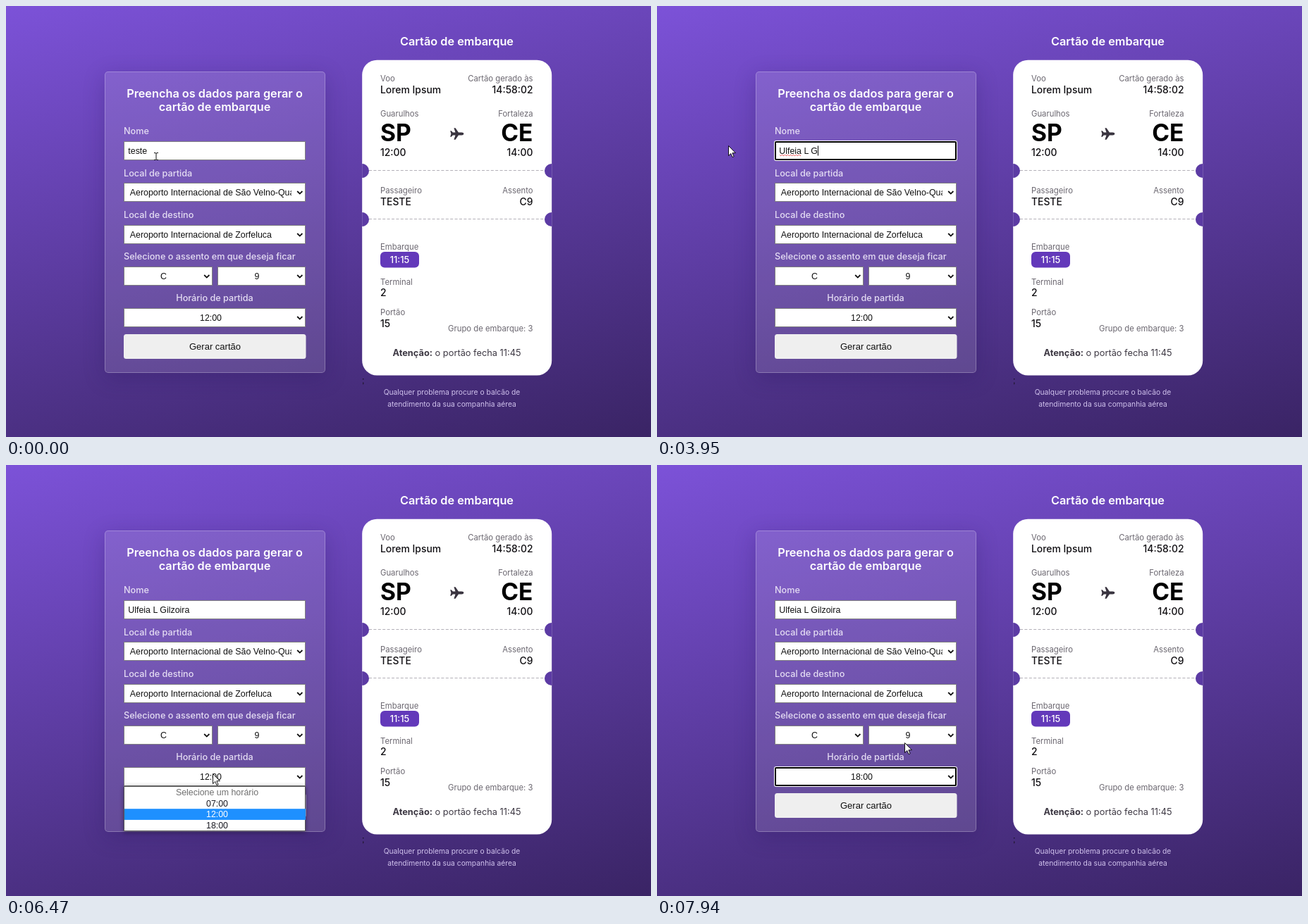
These frames come from a looping animation (915x612 px, 8 s). An HTML page:

```html
<!DOCTYPE html>
<html lang="pt-BR">
<head>
<meta charset="utf-8">
<title>Cartão de embarque</title>
<style>
  html, body { margin: 0; width: 100%; height: 100%; overflow: hidden; }
  body { position: relative; background: linear-gradient(167deg, #7c52d8, #3a2465); }
  #panel {
    position: absolute; left: 140px; top: 93px; width: 313px; height: 428px;
    box-sizing: border-box; border: 1px solid rgba(255,255,255,.24); border-radius: 5px;
    background: rgba(255,255,255,.12); box-shadow: 0 7px 30px rgba(35,20,90,.26);
  }
  svg { position: absolute; left: 0; top: 0; display: block; }
  text { white-space: pre; font-family: Inter, "Open Sans", sans-serif; }
  .ui { font: 12.4px "Liberation Sans", Arial, sans-serif; fill: #111; }
  .button { font-size: 13px; }
  .title { font-size: 16.3px; font-weight: 600; fill: #fff; }
  .field { font-size: 12.65px; font-weight: 500; fill: #e4dcf3; }
  .label { font-size: 11.3px; fill: #6b6770; }
  .value { font-size: 13.9px; font-weight: 550; fill: #121014; }
  .code { font-size: 33.6px; font-weight: 700; fill: #000; }
  .pill { font-size: 12.8px; font-weight: 550; fill: #fff; }
  .notice { font-size: 12.8px; fill: #3d3843; }
  .notice tspan { font-weight: 700; }
  .foot { font-size: 10.3px; font-weight: 400; fill: #cfc1ec; }
  .box { fill: #fff; stroke: #808080; }
  .ring { fill: none; stroke: #000; stroke-width: 2; }
  .halo { fill: none; stroke: #fff; stroke-width: 2; }
</style>
</head>
<body>
<div id="panel"></div>
<svg id="stage" width="915" height="612" viewBox="0 0 915 612">
  <defs>
    <clipPath id="airportClip"><rect x="170" y="250" width="235" height="30"/></clipPath>
    <clipPath id="cardClip"><rect x="505.2" y="76.7" width="269" height="447.8" rx="21"/></clipPath>
    <clipPath id="selectionClip"><rect id="selectionArea" y="198" height="15"/></clipPath>
    <filter id="shadow" x="-10%" y="-30%" width="120%" height="160%">
      <feDropShadow dx="0" dy="1" stdDeviation="3" flood-opacity=".45"/>
    </filter>
  </defs>

  <g id="form"></g>

  <text id="typed" class="ui" x="173.3" y="210"></text>
  <g id="selection">
    <rect id="selectionFill" y="198" height="15" fill="#3390ff"/>
    <text class="ui" x="173.3" y="210" style="fill:#fff" clip-path="url(#selectionClip)">teste</text>
  </g>
  <path id="squiggle" fill="none" stroke="#e33" stroke-width=".9"/>
  <rect id="caret" y="198.5" width="1" height="14" fill="#000"/>
  <g id="nameFocus"></g>
  <g id="timeFocus"></g>

  <g id="card">
    <g clip-path="url(#cardClip)">
      <rect x="505" y="76" width="270" height="449" fill="#fff"/>
      <g fill="#5c3ba4">
        <circle cx="505" cy="234" r="10"/><circle cx="774" cy="234" r="10"/>
        <circle cx="505" cy="303" r="10"/><circle cx="774" cy="303" r="10"/>
      </g>
      <path d="M515 233.5H764M515 302.5H764" stroke="#b3b0b8" stroke-dasharray="4 2.4"/>
    </g>
    <path fill="#39343f" d="M649.3 181.5q0-1.9-2.8-1.9h-4.6l-4.3-6.4h-2.2l2.1 6.4h-3.6l-2.1-2.4h-1.6l1.2 4.3-1.2 4.3h1.6l2.1-2.4h3.6l-2.1 6.4h2.2l4.3-6.4h4.6q2.8 0 2.8-1.9z"/>
    <rect x="531" y="349" width="55" height="22.5" rx="6" fill="#6339ba"/>
  </g>

  <g id="menu">
    <rect x="167.5" y="456.5" width="257" height="63" fill="#fff" stroke="#555" filter="url(#shadow)"/>
    <rect id="highlight" x="168" width="257" height="15.7" fill="#1e90ff"/>
  </g>

  <circle id="press" r="10" fill="#c4b440" fill-opacity=".74"/>
  <path id="arrow" fill="#fff" stroke="#000" stroke-width=".9" stroke-linejoin="round"
        d="M.5.5V14.6L3.8 11.5 6 16.6 8.1 15.7 5.9 10.7H10.4Z"/>
  <path id="beam" fill="none" stroke="#111" d="M-3-4.5h2.2l.8 1 .8-1H3M0-4V4.5M-3 5.5h2.2l.8-1 .8 1H3"/>
</svg>
<script>
const LOOP = 8000;
const $ = id => document.getElementById(id);

function add(parent, tag, attrs, content) {
  const node = document.createElementNS("http://www.w3.org/2000/svg", tag);
  for (const key in attrs) node.setAttribute(key, attrs[key]);
  if (content) node.textContent = content;
  $(parent).append(node);
  return node;
}
const write = (parent, cls, x, y, content, anchor = "start") =>
  add(parent, "text", { class: cls, x, y, "text-anchor": anchor }, content);

const FIELD_HEIGHT = 27;
function field(x, y, width, isSelect) {
  add("form", "rect", {
    class: "box", x: x + .5, y: y + .5, width: width - 1, height: FIELD_HEIGHT - 1
  });
  if (isSelect) add("form", "path", {
    d: `M${x + width - 11.8} ${y + 12}l3.6 3.6 3.6-3.6`,
    fill: "none", stroke: "#111", "stroke-width": 1.8
  });
}
function focusRing(parent, x, y, width) {
  add(parent, "rect", { class: "halo", x, y, width, height: FIELD_HEIGHT, rx: 2 });
  add(parent, "rect", {
    class: "ring", x: x + 1, y: y + 1, width: width - 2, height: FIELD_HEIGHT - 2, rx: 1
  });
}

// Form
write("form", "title", 296, 130, "Preencha os dados para gerar o", "middle");
write("form", "title", 296, 149, "cartão de embarque", "middle");
write("form", "field", 167, 182, "Nome");
write("form", "field", 167, 241.5, "Local de partida");
write("form", "field", 167, 300.5, "Local de destino");
write("form", "field", 167, 360, "Selecione o assento em que deseja ficar");
write("form", "field", 296, 419, "Horário de partida", "middle");
field(167, 192, 258);
field(167, 251, 258, true);
field(167, 311, 258, true);
field(167, 370, 126, true);
field(300, 370, 125, true);
field(167, 429, 258, true);
focusRing("nameFocus", 167, 192, 258);
focusRing("timeFocus", 167, 429, 258);
write("form", "ui", 175.8, 269, "Aeroporto Internacional de São Velno-Quaridas")
  .setAttribute("clip-path", "url(#airportClip)");
write("form", "ui", 175.8, 328.5, "Aeroporto Internacional de Zorfeluca");
write("form", "ui", 223.5, 388, "C", "middle");
write("form", "ui", 356, 388, "9", "middle");
const departure = write("form", "ui", 290.5, 447, "12:00", "middle");
add("form", "rect", { x: 167, y: 466, width: 258.5, height: 35, rx: 3.5, fill: "#efefef" });
write("form", "ui button", 296.5, 487.5, "Gerar cartão", "middle");

// Boarding card
write("card", "title", 639.5, 56, "Cartão de embarque", "middle");
const pair = (cls, y, left, right) => {
  write("card", cls, 531, y, left);
  if (right) write("card", cls, 747.5, y, right, "end");
};
pair("label", 107, "Voo", "Cartão gerado às");
pair("value", 123.5, "Lorem Ipsum", "14:58:02");
pair("label", 157, "Guarulhos", "Fortaleza");
pair("code", 191.5, "SP", "CE");
pair("value", 213, "12:00", "14:00");
pair("label", 266, "Passageiro", "Assento");
pair("value", 283, "TESTE", "C9");
pair("label", 346, "Embarque");
write("card", "pill", 558.5, 365, "11:15", "middle");
pair("label", 395.5, "Terminal");
pair("value", 412, "2");
pair("label", 439, "Portão");
pair("value", 456, "15");
write("card", "label", 747.5, 461.5, "Grupo de embarque: 3", "end");
write("card", "notice", 639.5, 497, "", "middle").innerHTML =
  "<tspan>Atenção:</tspan> o portão fecha 11:45";
write("card", "ui", 505, 536, ";");
write("card", "foot", 632.5, 552, "Qualquer problema procure o balcão de", "middle");
write("card", "foot", 632.5, 568.5, "atendimento da sua companhia aérea", "middle");

// Time menu
const ROW = 15.7, MENU_TOP = 456.8;
const options = ["Selecione um horário", "07:00", "12:00", "18:00"].map((label, i) =>
  write("menu", "ui", 299.5, MENU_TOP + i * ROW + 12.2, label, "middle"));

let wave = "M174 211.5";
for (let i = 0; i < 15; i++) wave += `l1 ${i % 2 ? -1 : 1}h1`;
$("squiggle").setAttribute("d", wave);

// Motion
const NAME = "Ulfeia L Gilzoira";
const KEYS = [1480, 1680, 1780, 1880, 2080, 2560, 2690, 3090, 3490, 3950, 4080,
              4610, 4680, 4750, 4820, 4890, 4960];
const POINTER = [
  [0, 213, 213], [140, 211, 213], [480, 108, 199], [550, 105, 198], [750, 101, 198],
  [5560, 101, 198], [6330, 293, 438], [6500, 293, 438], [7180, 310, 505],
  [7250, 309, 505], [7450, 309, 505], [7940, 351, 394], [8000, 351, 394]
];

function pointerAt(t) {
  const i = POINTER.findIndex(p => p[0] > t);
  const [t0, x0, y0] = POINTER[i - 1], [t1, x1, y1] = POINTER[i];
  const u = (t - t0) / (t1 - t0), k = u * u * (3 - 2 * u);
  return [x0 + (x1 - x0) * k, y0 + (y1 - y0) * k];
}

const show = (id, on) => $(id).setAttribute("visibility", on ? "visible" : "hidden");
const move = (id, x, y) => $(id).setAttribute("transform", `translate(${x} ${y})`);

function render(t) {
  const [x, y] = pointerAt(t);
  const count = KEYS.filter(k => k <= t).length;
  const focused = t >= 140 && t < 6400;

  $("typed").textContent = count ? NAME.slice(0, count) : "teste";
  show("nameFocus", focused);
  show("squiggle", focused && count > 6);
  show("caret", count && focused && !(t >= 5560 && t < 6060));
  $("caret").setAttribute("x", 173.3 + $("typed").getComputedTextLength());

  const start = Math.max(173.3, Math.min(200.3, x));
  show("selection", focused && !count);
  for (const id of ["selectionFill", "selectionArea"]) {
    $(id).setAttribute("x", start);
    $(id).setAttribute("width", 200.3 - start);
  }

  const menuOpen = t >= 6400 && t < 7450;
  const hovered = Math.floor((y - MENU_TOP + .5) / ROW);
  const row = hovered < 1 ? 2 : Math.min(hovered, 3);
  show("menu", menuOpen);
  $("highlight").setAttribute("y", MENU_TOP + row * ROW);
  options.forEach((o, i) => o.style.fill = i === row ? "#fff" : i ? "#1c1c24" : "#707070");

  departure.textContent = t >= 7450 ? "18:00" : "12:00";
  show("timeFocus", t >= 7450);

  const beam = t < 480 && x > 167;
  show("beam", beam);
  show("arrow", !beam);
  show("press", (t >= 140 && t < 750) || (t >= 6400 && t < 6470));
  for (const id of ["beam", "arrow", "press"]) move(id, x, y);
}

const begin = performance.now();
function tick() {
  render((performance.now() - begin) % LOOP);
  requestAnimationFrame(tick);
}
render(0);
requestAnimationFrame(tick);
</script>
</body>
</html>
```
